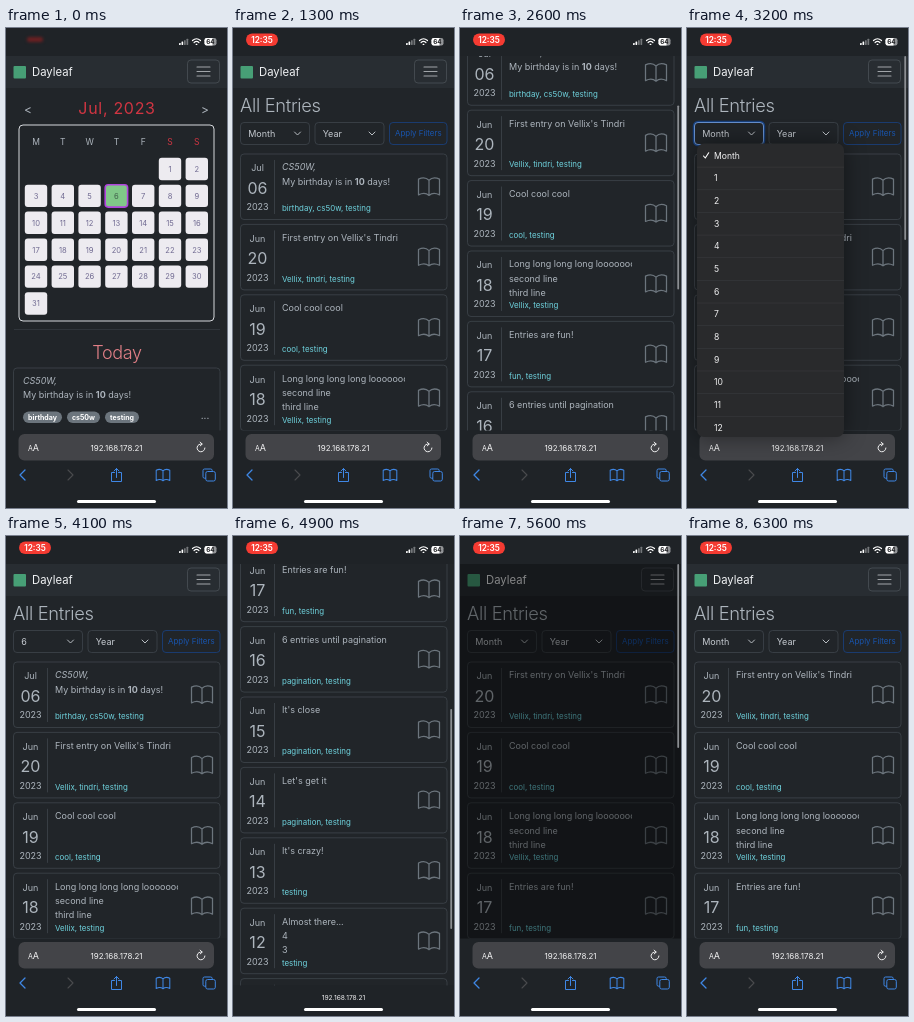
An HTML page with a canvas for the animation above (6400 ms loop, 221 by 480 pixels).

```html
<!DOCTYPE html>
<html lang="en">
<head>
<meta charset="utf-8">
<title>Diary app demo</title>
<style>
html, body { margin: 0; width: 100%; height: 100%; overflow: hidden; background: #212529; }
canvas { display: block; width: 221px; height: 480px; }
</style>
</head>
<body>
<canvas id="stage"></canvas>
<script>
const W = 221, H = 480, LOOP = 6400, STEP = 100, MAX_SCROLL = 440.6, CARD_STEP = 70.4;
const canvas = document.getElementById('stage');
const ratio = window.devicePixelRatio || 1;
canvas.width = W * ratio;
canvas.height = H * ratio;
const ctx = canvas.getContext('2d');

const APP = 'Dayleaf';
const BG = '#212529', NAV = '#282d32', BAR = '#1f2327', LINE = '#434a51';
const TEXT = '#adb5bd', BLUE = '#3f87e5', RED = '#d03542', GREY = '#6c757d';

// month, day, tags, then text lines
const july = ['Jul', '06', 'birthday, cs50w, testing', '_CS50W,', 'My birthday is in *10* days!'];
const june = [
  ['Jun', '20', 'Vellix, tindri, testing', "First entry on Vellix's Tindri"],
  ['Jun', '19', 'cool, testing', 'Cool cool cool'],
  ['Jun', '18', 'Vellix, testing', 'Long long long long looooooooooong', 'second line', 'third line'],
  ['Jun', '17', 'fun, testing', 'Entries are fun!'],
  ['Jun', '16', 'pagination, testing', '6 entries until pagination'],
  ['Jun', '15', 'pagination, testing', "It's close"],
  ['Jun', '14', 'pagination, testing', "Let's get it"],
  ['Jun', '13', 'testing', "It's crazy!"],
  ['Jun', '12', 'testing', 'Almost there...', '4', '3']
];
const allEntries = [july, ...june];
const juneEntries = [...june, ['Jun', '11', 'testing', '']];

// Eased value at t through [time, value] points
function track(t, points) {
  if (t <= points[0][0]) return points[0][1];
  for (let i = 1; i < points.length; i++) {
    const [t0, a] = points[i - 1], [t1, b] = points[i];
    if (t <= t1) {
      const p = (t - t0) / (t1 - t0);
      return a + (b - a) * p * p * (3 - 2 * p);
    }
  }
  return points[points.length - 1][1];
}
const between = (t, a, b) => t >= a && t < b;

function text(str, x, y, size = 9, color = TEXT, align = 'left', style = '400', spacing = 0) {
  ctx.font = `${style} ${size}px Inter, sans-serif`;
  ctx.letterSpacing = spacing + 'px';
  ctx.textAlign = align;
  ctx.textBaseline = 'alphabetic';
  ctx.fillStyle = color;
  ctx.fillText(str, x, y + size * 0.38);
  return ctx.measureText(str).width;
}

// *bold* parts, and a leading underscore for italics
function richText(str, x, y) {
  if (str[0] === '_') {
    text(str.slice(1), x, y, 9, TEXT, 'left', 'italic 400');
    return;
  }
  str.split('*').forEach((part, i) => {
    x += text(part, x, y, 9, TEXT, 'left', i % 2 ? '700' : '400');
  });
}

function box(x, y, w, h, r, fill, stroke, width = 0.7) {
  ctx.beginPath();
  ctx.roundRect(x, y, w, h, r);
  if (fill) { ctx.fillStyle = fill; ctx.fill(); }
  if (stroke) { ctx.strokeStyle = stroke; ctx.lineWidth = width; ctx.stroke(); }
}

function path(d, x, y, color, width = 1) {
  ctx.save();
  ctx.translate(x, y);
  ctx.strokeStyle = color;
  ctx.lineWidth = width;
  ctx.lineCap = ctx.lineJoin = 'round';
  ctx.stroke(new Path2D(d));
  ctx.restore();
}

function openBook(x, y, scale, color, width) {
  ctx.save();
  ctx.translate(x, y);
  ctx.scale(scale, scale);
  path('M0-6Q-4-10-10-7V8Q-4 5 0 8.5Q4 5 10 8V-7Q4-10 0-6V8.5', 0, 0, color, width);
  ctx.restore();
}

function navBar() {
  ctx.fillStyle = NAV;
  ctx.fillRect(0, 28, W, 32);
  box(7.5, 38, 12.5, 12.5, 1, '#479f76');
  text(APP, 26, 44, 11.3, '#f1f3f5');
  box(181.5, 32, 32, 23, 3.5, null, '#50565c');
  path('M0 0H13M0 4.5H13M0 9H13', 191, 39, '#a1a5a9', 1.1);
}

function calendar() {
  text('<', 22, 81, 12, TEXT, 'center');
  text('>', 199, 81, 12, TEXT, 'center');
  text('Jul, 2023', 111, 80, 16, RED, 'center', '400', 0.7);
  box(13, 97, 195, 196, 4, null, '#d5d8dc', 1);
  const colX = i => 30 + i * 26.8;
  [...'MTWTFSS'].forEach((day, i) =>
    text(day, colX(i), 114, 8.5, i > 4 ? RED : TEXT, 'center'));
  for (let day = 1; day <= 31; day++) {
    const slot = day + 4, x = colX(slot % 7), y = 141 + Math.floor(slot / 7) * 26.9;
    const today = day === 6;
    box(x - 11.2, y - 11.2, 22.4, 22.4, 3, today ? '#80c788' : '#edebf0',
      today ? '#b044dc' : null, 1.6);
    text(day, x, y, 7.6, today ? '#42634d' : '#716b92', 'center');
  }
}

function homePage() {
  navBar();
  calendar();
  ctx.fillStyle = '#343a40';
  ctx.fillRect(8, 301, 206, 0.8);
  text('Today', 111, 324, 18, '#e17f86', 'center', '300', -0.3);
  box(7.5, 340, 206.5, 80, 3.5, null, LINE);
  richText(july[3], 17, 353);
  richText(july[4], 17, 366.5);
  [['birthday', 17, 39], ['cs50w', 61, 33], ['testing', 99, 34]].forEach(([tag, x, w]) => {
    box(x, 383.5, w, 11.5, 5.75, GREY);
    text(tag, x + w / 2, 389, 7, '#fff', 'center', '700');
  });
  text('...', 199, 387, 10, TEXT, 'center');
}

function selectBox(label, x, w, focused) {
  if (focused) box(x, 94.5, w, 22, 3.5, null, '#173f7c', 3.5);
  box(x, 94.5, w, 22, 3.5, BG, focused ? '#86b7fe' : LINE);
  text(label, x + 7.7, 105.3, 9, '#c5cad0');
  path('M-3-1.5L0 1.5L3-1.5', x + w - 12, 105.5, '#b9bec3', 1);
}

function entryCard([month, day, tags, ...lines], y) {
  box(7.5, y, 206.5, 65.5, 3.5, null, LINE);
  text(month, 24.5, y + 14, 9, TEXT, 'center');
  text(day, 24.5, y + 33.7, 16, TEXT, 'center');
  text('2023', 24.5, y + 53, 9, TEXT, 'center');
  ctx.fillStyle = LINE;
  ctx.fillRect(41.3, y + 6, 0.7, 54);
  ctx.save();
  ctx.beginPath();
  ctx.rect(48, y + 1, 124, 64);
  ctx.clip();
  lines.forEach((line, i) => richText(line, 49, y + 13 + i * 14.3));
  ctx.restore();
  text(tags, 49, y + 54.3, 7.9, '#6fd3de');
  openBook(196, y + 32.5, 1.05, GREY, 1.2);
}

function pageEnd(y) {
  box(45, y, 131, 24, 3.5, BG, LINE);
  box(45, y, 29.5, 24, [3.5, 0, 0, 3.5], '#343a40', LINE);
  box(147, y, 29, 24, [0, 3.5, 3.5, 0], null, LINE);
  text('1 / 2', 111, y + 12, 8.8, TEXT, 'center');
  [[60, -1, '#858c93'], [161.5, 1, '#6ea8fe']].forEach(([x, dir, color]) => {
    ctx.beginPath();
    ctx.arc(x, y + 12, 7, 0, Math.PI * 2);
    ctx.strokeStyle = color;
    ctx.lineWidth = 1;
    ctx.stroke();
    path(`M${-3.5 * dir} 0H${3.5 * dir}M${dir} -2.5L${3.5 * dir} 0L${dir} 2.5`, x, y + 12, color);
  });
  const credit = `Harvard CS50W Final Project "${APP}" by `;
  const x = 17.5 + text(credit, 17.5, y + 42, 7.9, GREY);
  const width = text('Orvan', x, y + 42, 7.9, '#3470c4');
  ctx.fillRect(x, y + 46, width, 0.6);
}

function listPage(t, scroll) {
  ctx.save();
  ctx.translate(0, -scroll);
  navBar();
  text('All Entries', 7, 77.5, 18.3, TEXT, 'left', '300', -0.3);
  selectBox(between(t, 3700, 4200) ? '6' : 'Month', 7.5, 69, between(t, 3000, 4000));
  selectBox('Year', 82, 69, false);
  box(156.5, 94.5, 57.5, 22, 3.5, null, '#17468f');
  text('Apply Filters', 185.3, 105, 7.9, '#1855ae', 'center');
  const entries = t < 4200 ? allEntries : juneEntries;
  entries.forEach((entry, i) => entryCard(entry, 126 + i * CARD_STEP));
  pageEnd(126 + entries.length * CARD_STEP + 5);
  ctx.restore();
}

function monthMenu() {
  ctx.save();
  ctx.shadowColor = 'rgba(0,0,0,0.45)';
  ctx.shadowBlur = 22 * ratio;
  box(10, 115.5, 147, 293.5, 7, '#292a2c');
  ctx.restore();
  const rowH = 22.65;
  for (let i = 0; i <= 12; i++) {
    const y = 127.5 + i * rowH;
    text(i || 'Month', 27, y, 8.6, '#f1f1f2');
    ctx.fillStyle = '#38393c';
    if (i < 12) ctx.fillRect(10, y + rowH / 2, 147, 0.6);
  }
  path('M-2.5 .5L-.7 2.5L2.7-2.7', 19, 127.5, '#fff', 1.1);
}

function sideMenu(x) {
  ctx.fillStyle = BG;
  ctx.fillRect(x, 28, W, 400);
  text(APP, x + 9, 44, 11.3, '#f1f3f5');
  text('All Entries', x + 9, 75, 9, TEXT);
}

function scrollThumb(scroll, collapse) {
  const length = 374.5 + 47 * collapse, size = 184 + 36 * collapse;
  box(217.3, 28 + (length - size) * scroll / MAX_SCROLL, 1.8, size, 0.9, '#8b8e92');
}

function statusBar(t) {
  ctx.fillStyle = BAR;
  ctx.fillRect(0, 0, W, 28);
  if (t < 100) {
    ctx.save();
    ctx.filter = 'blur(1.5px)';
    box(21, 9, 16, 5, 2.5, '#6b2022');
    ctx.restore();
  } else {
    box(13, 5.5, 32, 12.5, 6.2, '#f53b32');
    text('12:35', 29, 11.8, 8.3, '#fff', 'center', '600');
  }
  for (let i = 0; i < 4; i++) {
    const h = 2 + i * 1.4;
    box(173 + i * 2.5, 17 - h, 1.7, h, 0.4, i < 2 ? '#fff' : '#74777a');
  }
  path('M-4-2.5Q0-6 4-2.5M-2.4-.5Q0-2.6 2.4-.5M-.4 1.3H.4', 190.5, 15, '#fff', 1.2);
  box(198.5, 10, 12, 7.5, 2.2, '#929497');
  box(198.5, 10, 8, 7.5, [2.2, 0, 0, 2.2], '#fff');
  text('64', 204.4, 13.8, 6.3, '#202124', 'center', '700');
}

function browserBar(collapse) {
  const top = 402.5 + 47 * collapse;
  ctx.fillStyle = BAR;
  ctx.fillRect(0, top, W, H - top);
  ctx.save();
  ctx.globalAlpha = 1 - collapse;
  ctx.translate(0, 40 * collapse);
  box(12.5, 406, 195.5, 26.5, 6, '#434448');
  text('A', 22, 420.5, 7, '#f1f1f2');
  text('A', 26.8, 419.5, 9, '#f1f1f2');
  path('M1-3.6A3.9 3.9 0 1 0 3.9 .3M-.8-5.6L1.2-3.6L-.8-1.8', 195, 419.7, '#f1f1f2', 1);
  path('M2-5L-3 0L2 5', 17, 447, BLUE, 1.3);
  path('M-2-5L3 0L-2 5', 64, 447, '#4a4b4e', 1.1);
  path('M-2-2.5H-5V6.5H5V-2.5H2M0 2.5V-6.5M-2.5-4L0-6.5L2.5-4', 110.5, 447, BLUE);
  openBook(157, 447, 0.68, BLUE, 1.5);
  box(199.8, 443.5, 9.5, 9.5, 1.8, null, BLUE, 1);
  path('M-3.5 3.2H-4.5Q-6 3.2-6 1.7V-4.5Q-6-6 -4.5-6H1.7Q3.2-6 3.2-4.5V-3.5', 203, 447, BLUE);
  ctx.restore();
  text('192.168.178.21', 110.5, 419.5 + 41.5 * collapse, 8 - 1.3 * collapse, '#f1f1f2', 'center');
  box(71, 472, 79, 3, 1.5, '#fff');
}

function draw(t) {
  const scroll = track(t, [[1400, 0], [2100, MAX_SCROLL], [2200, MAX_SCROLL], [2800, 0],
    [4300, 0], [4900, 317], [5000, 317], [5400, 0]]);
  const collapse = track(t, [[1500, 0], [1800, 1], [2300, 1], [2600, 0],
    [4300, 0], [4600, 1], [5000, 1], [5300, 0]]);
  const dim = track(t, [[300, 0], [500, 0.5], [800, 0.5], [900, 0],
    [5400, 0], [5600, 0.45], [5900, 0]]);

  ctx.setTransform(ratio, 0, 0, ratio, 0, 0);
  ctx.fillStyle = BG;
  ctx.fillRect(0, 0, W, H);
  if (t < 900) homePage(); else listPage(t, scroll);
  if (dim) {
    ctx.fillStyle = `rgba(0,0,0,${dim})`;
    ctx.fillRect(0, 28, W, H);
  }
  if (between(t, 400, 900)) sideMenu(track(t, [[300, W], [600, 0]]));
  if (between(t, 1500, 3500) || between(t, 4300, 5800)) scrollThumb(scroll, collapse);
  statusBar(t);
  browserBar(collapse);
  if (between(t, 3100, 3700)) monthMenu();
}

const start = performance.now();
function frame() {
  const t = (performance.now() - start) % LOOP;
  draw(Math.floor(t / STEP) * STEP);
  requestAnimationFrame(frame);
}
frame();
</script>
</body>
</html>
```
